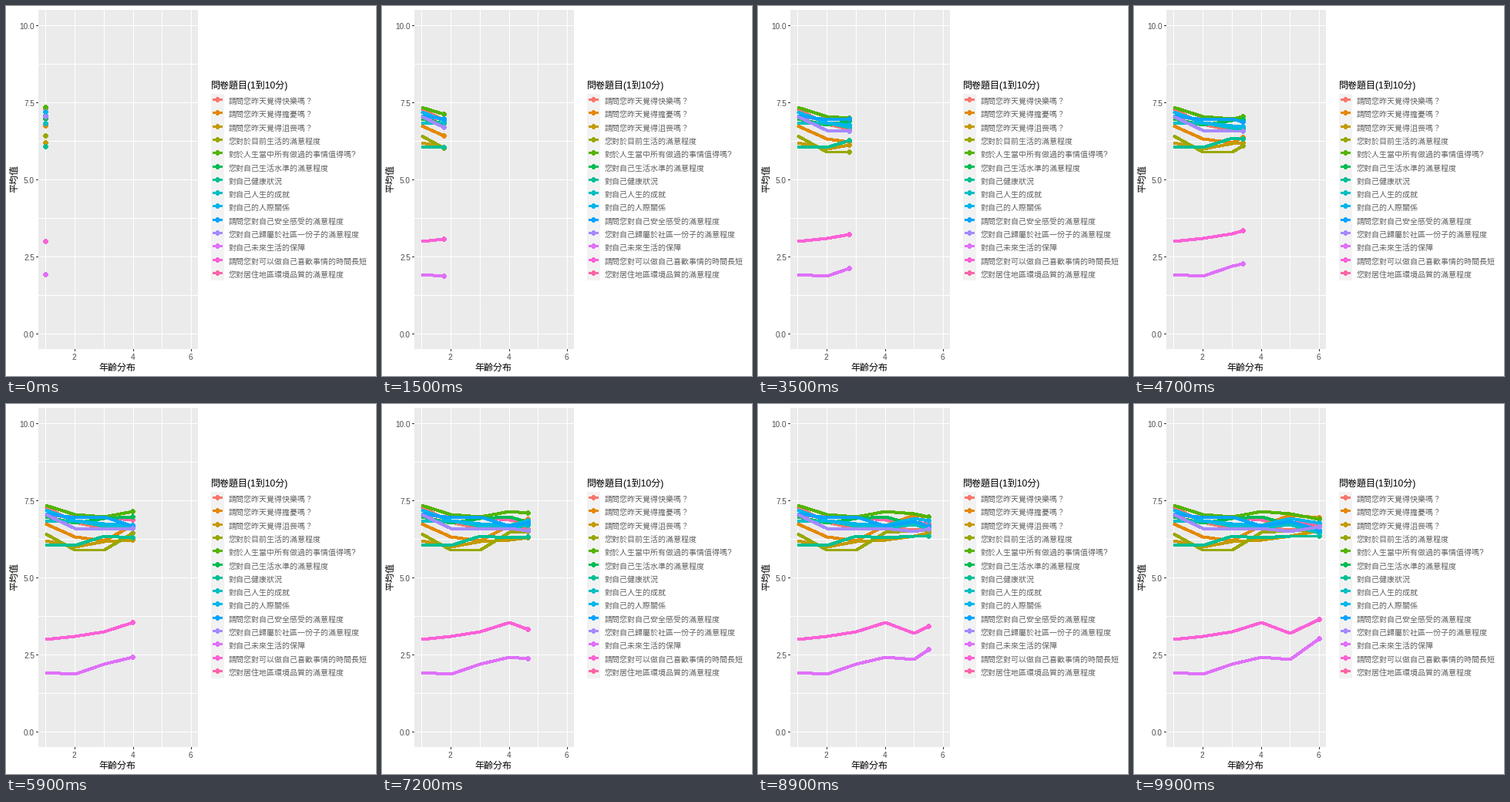
A matplotlib script for the animation above (10 s loop, 480 by 480 pixels).

```python
import matplotlib.pyplot as plt
import numpy as np
from matplotlib.animation import FuncAnimation
from matplotlib.patches import Circle, Rectangle

FRAMES, INTERVAL = 100, 100
PT = 0.72  # points per pixel at 100 dpi

plt.rcParams["font.family"] = ["Liberation Sans", "Noto Sans CJK JP"]

# label, colour, mean score for age groups 1 to 6
SERIES = [
    ("請問您昨天覺得快樂嗎？", "#F8766D", (7.30, 6.80, 6.60, 6.63, 6.55, 6.65)),
    ("請問您昨天覺得擔憂嗎？", "#E38900", (6.75, 6.33, 6.20, 6.70, 7.03, 6.94)),
    ("請問您昨天覺得沮喪嗎？", "#C49A00", (6.20, 6.00, 6.17, 6.22, 6.35, 6.53)),
    ("您對於目前生活的滿意程度", "#99A800", (6.42, 5.89, 5.89, 6.47, 6.53, 6.52)),
    ("對於人生當中所有做過的事情值得嗎?", "#53B400", (7.35, 7.05, 6.98, 7.15, 7.07, 6.90)),
    ("您對自己生活水準的滿意程度", "#00BC56", (6.98, 6.77, 6.93, 6.97, 6.72, 6.53)),
    ("對自己健康狀況", "#00C094", (6.08, 6.04, 6.35, 6.30, 6.35, 6.35)),
    ("對自己人生的成就", "#00BFC4", (6.83, 6.85, 6.67, 6.63, 6.73, 6.45)),
    ("對自己的人際關係", "#00B6EB", (7.20, 6.84, 6.75, 6.70, 6.92, 6.78)),
    ("請問您對自己安全感受的滿意程度", "#06A4FF", (7.08, 6.94, 6.98, 6.68, 6.82, 6.55)),
    ("您對自己歸屬於社區一份子的滿意程度", "#A58AFF", (7.05, 6.60, 6.58, 6.60, 6.50, 6.66)),
    ("對自己未來生活的保障", "#DF70F8", (1.93, 1.87, 2.20, 2.42, 2.35, 3.03)),
    ("請問您對可以做自己喜歡事情的時間長短", "#FB61D7", (3.00, 3.10, 3.25, 3.55, 3.20, 3.65)),
    ("您對居住地區環境品質的滿意程度", "#FF66A8", (7.02, 6.97, 6.96, 6.87, 6.80, 6.72)),
]
STACK = SERIES[-1:] + SERIES[:-1]  # bottom to top
AGES = np.arange(1, 7)


# pixel centres
def to_x(age):
    return np.round(51.4 + 37.75 * (np.asarray(age) - 1)) + 0.5


def to_y(score):
    return np.round(425 - 40 * np.asarray(score)) + 0.5


fig = plt.figure(figsize=(4.8, 4.8), dpi=100, facecolor="white")
ax = fig.add_axes([0, 0, 1, 1])
ax.set_xlim(0, 480)
ax.set_ylim(480, 0)
ax.axis("off")


def box(x, y, w, h, color):
    ax.add_patch(Rectangle((x, y), w, h, color=color, lw=0))


def line(xs, ys, color, width, z=2):
    return ax.plot(xs, ys, color=color, lw=width * PT, zorder=z, snap=False,
                   antialiased=False, solid_capstyle="butt",
                   solid_joinstyle="round")[0]


def dot(x, y, color):
    return ax.add_patch(Circle((x, y), 2.6, fc=color, lw=0, zorder=4,
                               antialiased=False))


def text(x, y, s, size, color="black", **kw):
    ax.text(x, y, s, fontsize=size * PT, color=color, **kw)


# panel, grid and axes
box(42, 5, 207, 440, "#EBEBEB")
for age in AGES:
    x = to_x(age)
    line([x, x], [5, 445], "white", 1)
    if age % 2 == 0:
        line([x, x], [445, 448], "#333333", 1)
        text(x - 1, 459, str(age), 10, "#4D4D4D", ha="center")
for i in range(9):
    score = 1.25 * i
    y = to_y(score)
    line([42, 249], [y, y], "white", 1)
    if i % 2 == 0:
        line([39, 42], [y, y], "#333333", 1)
        text(37, y + 4, f"{score:.1f}", 10, "#4D4D4D", ha="right")
text(144, 473, "年齡分布", 12, ha="center")
text(11, 224.5, "平均值", 12, rotation=90, ha="center", va="center")

# legend
KEY = 17.28
text(266, 106.5, "問卷題目(1到10分)", 12)
box(266, 114, 17, 14 * KEY, "#F2F2F2")
for i, (label, color, _) in enumerate(SERIES):
    y = np.floor(114 + KEY * (i + 0.5)) - 0.5
    line([268, 281], [y, y], color, 3)
    dot(274.5, y, color)
    text(289, y + 5, label, 10, "#606060")

lines = [line([], [], color, 3, 3) for _, color, _ in STACK]
dots = [dot(0, 0, color) for _, color, _ in STACK]


def update(i):
    now = 1 + 5 * i / (FRAMES - 1)
    ages = np.append(AGES[AGES < now], now)
    xs = to_x(ages)
    for (_, _, scores), path, head in zip(STACK, lines, dots):
        ys = to_y(np.interp(ages, AGES, scores))
        path.set_data(xs, ys)
        head.center = xs[-1], ys[-1]
    return lines + dots


anim = FuncAnimation(fig, update, frames=FRAMES, interval=INTERVAL,
                     repeat=True, repeat_delay=0)
plt.show()
```
